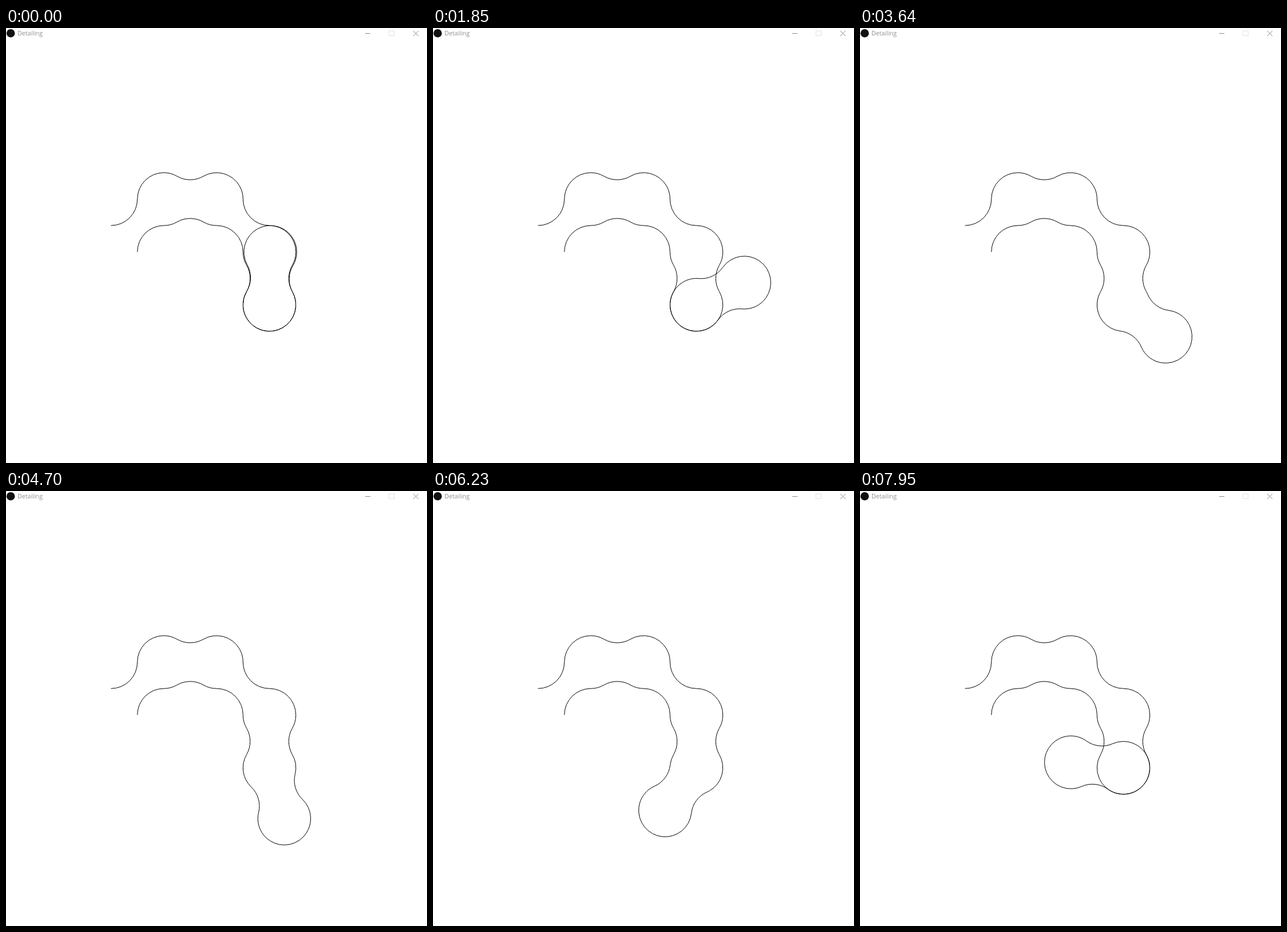
Write an HTML page with a canvas that moves like this. It is 736 px wide and 760 px high and loops after 8000 ms.

```html
<!DOCTYPE html>
<html lang="en">
<head>
<meta charset="utf-8">
<title>Detailing</title>
<style>
  html, body { margin: 0; width: 100%; height: 100%; overflow: hidden; background: #fff; }
  canvas, svg { position: absolute; left: 0; top: 0; }
  text { font: 10.7px "Open Sans", "Noto Sans", sans-serif; fill: #909090; }
</style>
</head>
<body>
<canvas id="stage" width="736" height="760"></canvas>
<svg width="736" height="20" fill="none">
  <circle cx="8.2" cy="9.2" r="7.3" fill="#111"/>
  <text x="20" y="13">Detailing</text>
  <path d="M628 9.5h9" stroke="#888"/>
  <rect x="669.5" y="5" width="9" height="8.5" stroke="#e2e2e2"/>
  <path d="M712 5l9 9m0-9l-9 9" stroke="#888"/>
</svg>
<script>
const ctx = document.getElementById('stage').getContext('2d');
const LOOP = 8000, STEP_MS = 66.2, LEAD_MS = 7;
const SPACING = 92.35, RADIUS = SPACING / 2;
const START_DEG = -89.05, STEP_RAD = 0.04;
const RISE = SPACING * Math.sqrt(3) / 2;   // height of the triangle between touching circles
const rad = deg => deg * Math.PI / 180;

// Grid columns and rows, counted back from the pivot, and the midpoints between nodes
const pivot = [460.55, 483.65];
const [x3, x2, x1, x0] = [0, 1, 2, 3].map(i => pivot[0] - i * SPACING);
const [y2, y1, y0] = [0, 1, 2].map(i => pivot[1] - i * SPACING);
const midX = (x1 + x2) / 2, midY = (y1 + y2) / 2;

// Clockwise arc, angles in degrees
function arc([x, y], from, to) {
  ctx.beginPath();
  ctx.arc(x, y, RADIUS, rad(from), rad(to));
  ctx.stroke();
}

const polar = ([x, y], deg) =>
  [x + SPACING * Math.cos(rad(deg)), y + SPACING * Math.sin(rad(deg))];

function drawBody() {
  // outer side
  arc([x0, y0], 0, 90);
  arc([x1, y0], 180, 300);
  arc([midX, y0 - RISE], 60, 120);
  arc([x2, y0], 240, 360);
  arc([x3, y0], 90, 180);
  arc([x3, y1], -90, 30);
  arc([x3 + RISE, midY], 150, 210);
  // inner side
  arc([x1, y1], 180, 270);
  arc([x1, y0], 60, 90);
  arc([midX, y0 + RISE], 240, 300);
  arc([x2, y0], 90, 120);
  arc([x2, y1], -90, 0);
  arc([x3, y1], 150, 180);
  arc([x3 - RISE, midY], -30, 30);
}

function drawHead(deg) {
  arc(pivot, -30, deg - 60);
  arc(polar(pivot, deg - 60), deg + 60, deg + 120);
  arc(polar(pivot, deg), deg - 120, deg + 120);
  arc(polar(pivot, deg + 60), deg + 240, deg + 300);
  arc(pivot, deg + 60, 210);
}

function render(now) {
  const step = Math.floor((now % LOOP + LEAD_MS) / STEP_MS);
  ctx.clearRect(0, 0, 736, 760);
  drawBody();
  drawHead(START_DEG + Math.min(step, 120) * STEP_RAD * 180 / Math.PI);
}

const start = performance.now();
function tick() {
  render(performance.now() - start);
  requestAnimationFrame(tick);
}
tick();
</script>
</body>
</html>
```
